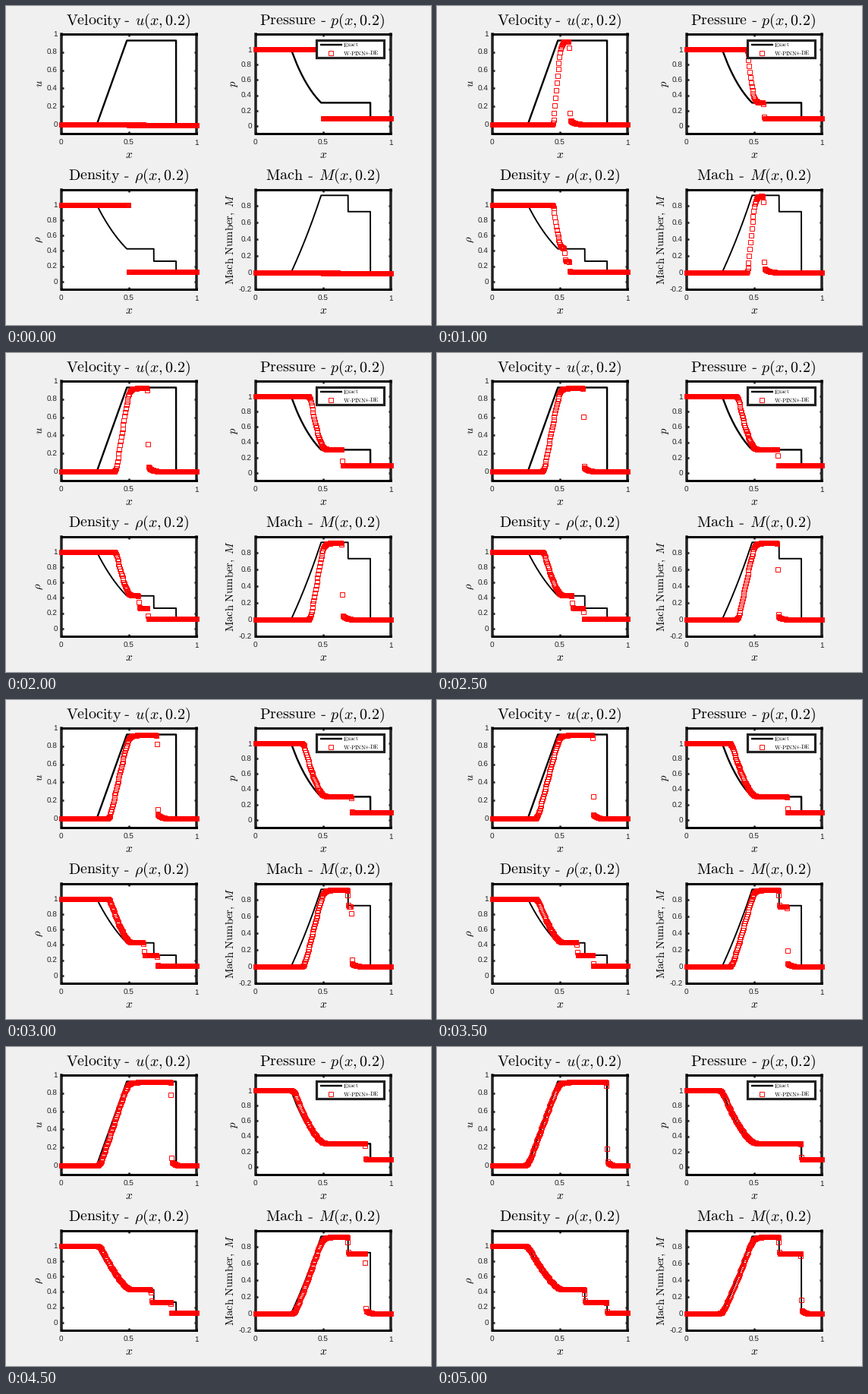
Animation, 560 px wide and 420 px high, one loop 5.5 s. Source, as a matplotlib script:

```python
import numpy as np
import matplotlib.pyplot as plt
from matplotlib.animation import FuncAnimation
from matplotlib.patches import Rectangle

W, H = 560, 420
PX = 0.72  # points per pixel at 100 dpi
STEPS, T_END = 11, 0.2
RED, DARK = "#ff0000", "#222222"
SQUARE = dict(marker="s", ls="", ms=5.2 * PX, mew=0.95 * PX, mec=RED, mfc="none")

plt.rcParams.update({
    "font.family": "Liberation Sans",
    "mathtext.fontset": "cm",
    "axes.unicode_minus": False,
    "text.hinting": "none",
})

# Sod shock tube constants
C0 = np.sqrt(1.4)
U_STAR, P_STAR, RHO_STAR = 0.9274, 0.3031, 0.2656
P_R, RHO_R = 0.1, 0.125
HEAD, TAIL, SHOCK = -C0, -0.0703, 1.7522


def exact(x, t):
    """Sharp solution: velocity, pressure, density."""
    s = (x - 0.5) / t
    u = U_STAR * np.clip((s - HEAD) / (TAIL - HEAD), 0, 1)
    a = 1 - 0.2 * u / C0
    p, rho = a**7, a**5
    rho = np.where(s > U_STAR, RHO_STAR, rho)
    ahead = s > SHOCK
    return np.where(ahead, 0, u), np.where(ahead, P_R, p), np.where(ahead, RHO_R, rho)


def drop(x, pos, width):
    """Smooth step from 1 down to 0."""
    return 0.5 * (1 - np.tanh((x - pos) / (2 * width)))


def predicted(x, t):
    """Slightly smeared network solution."""
    if t == 0:
        left = x < 0.5
        ripple = 0.008 * (np.abs(x - 0.56) < 0.055) * (np.sin(150 * x) > -0.3)
        u = np.where(left, 0, ripple - 0.008)
        return u, np.where(left, 1, P_R), np.where(left, 1, RHO_R)

    a, b = 0.5 + HEAD * t, 0.506 + TAIL * t
    da, db = 0.0015 + 0.035 * t, 0.008 + 0.03 * t
    ramp = da * np.logaddexp(0, (x - a) / da) - db * np.logaddexp(0, (x - b) / db)
    u = 0.919 * ramp / (b - a)
    k = 1 - 0.2 * u / C0

    pos = 0.5004 + 1.748 * t + 0.0022 * np.exp(-(t / 0.05)**4)
    shock = drop(x, pos, 0.001)
    contact = drop(x, 0.5 + U_STAR * t, 0.0016)
    foot = 0.057 * np.exp(-np.maximum(x - pos, 0) / (0.0356 - 0.09 * t))

    rho = k**5 * contact + RHO_STAR * (1 - contact)
    return (u * shock + foot * (1 - shock),
            k**7 * shock + P_R * (1 - shock),
            rho * shock + RHO_R * (1 - shock))


def sound(p, rho):
    return np.sqrt(1.4 * p / rho)


xs = np.linspace(0, 1, 210)
fine = np.linspace(0, 1, 3001)
_, p_end, rho_end = predicted(xs, T_END)
c_end = sound(p_end, rho_end)


def curves(t):
    u, p, rho = predicted(xs, t)
    return u, p, rho, u / c_end


fig = plt.figure(figsize=(W / 100, H / 100), dpi=100, facecolor="#f0f0f0")

# Pixel-coordinate layer for text and legend
top = fig.add_axes([0, 0, 1, 1], zorder=5)
top.set(xlim=(0, W), ylim=(H, 0))
top.axis("off")


def tex(x, y, s, px, **kw):
    kw.setdefault("va", "baseline")
    top.text(x, y, f"${s}$", fontsize=px * PX, color="black", **kw)


def hyphen(x, y, px):
    top.add_patch(Rectangle((x, y - 0.24 * px), 0.265 * px, 0.055 * px,
                            fc="black", lw=0, snap=False))


def panel(x, y, ylim, ticks, word, func, span, dash, ylabel, label_x, curve, lw):
    w, h = 178, 131.3
    ax = fig.add_axes([x / W, 1 - (y + h) / H, w / W, h / H])
    ax.set(xlim=(0, 1), ylim=ylim, xticks=[0, 0.5, 1], yticks=ticks)
    ax.set_xticklabels(["0", "0.5", "1"])
    ax.set_yticklabels([f"{round(v, 1):g}" for v in ticks])
    ax.tick_params(direction="in", length=2.8 * PX, width=2.6 * PX, color=DARK,
                   labelcolor=DARK, labelsize=10 * PX, top=True, right=True)
    ax.tick_params(axis="x", pad=8 * PX)
    ax.tick_params(axis="y", pad=5 * PX)
    for side, spine in ax.spines.items():
        level = side in ("top", "bottom")
        spine.set(color="black" if level else DARK, lw=(3 if level else 3.5) * PX)

    base = y - 12.2
    tex(span[0] - 1, base, rf"\mathrm{{{word}}}", 20)
    hyphen(dash, base, 20)
    tex(span[1], base, func, 20, ha="right")
    tex(x + w / 2 + 0.5, y + 159.7, "x", 15.5, ha="center", va="center")
    tex(label_x, y + h / 2, ylabel, 14.7, ha="center", va="center", rotation=90)

    ax.plot(fine, curve, color="black", lw=lw * PX, zorder=2)
    dots, = ax.plot([], [], clip_on=False, zorder=3, **SQUARE)
    return dots


u, p, rho = exact(fine, T_END)
fifths = np.arange(6) * 0.2
LEFT, RIGHT, UPPER, LOWER = 72.7, 328.7, 36.8, 241.6

dots = [
    panel(LEFT, UPPER, (-0.1, 1), fifths, "Velocity", "u(x,0.2)",
          (80, 243), 156.5, "u", 44, u, 2.4),
    panel(RIGHT, UPPER, (-0.1, 1.2), fifths, "Pressure", "p(x,0.2)",
          (335, 499), 415.5, "p", 301, p, 2.4),
    panel(LEFT, LOWER, (-0.1, 1.2), fifths, "Density", r"\rho(x,0.2)",
          (83, 241), 156, r"\rho", 44, rho, 1.9),
    panel(RIGHT, LOWER, (-0.2, 1), np.arange(-1, 5) * 0.2, "Mach", "M(x,0.2)",
          (343, 493), 398.5, r"\mathrm{Mach\ Number,}\ M", 296, u / sound(p, rho), 1.9),
]

# Legend
top.add_patch(Rectangle((408.6, 44.8), 89.4, 23.4, fc="white", ec=DARK, lw=3.2 * PX))
top.plot([413.5, 442.5], [51, 51], color="black", lw=2.4 * PX, solid_capstyle="butt")
top.plot(428, 62, **SQUARE)
tex(444, 53.5, r"\mathrm{Exact}", 7.6)
for x, part in ((444, "W"), (454.5, "PINNs"), (479, "DE")):
    tex(x, 64.5, rf"\mathrm{{{part}}}", 7.6)
for x in (453, 477.7):
    hyphen(x, 64.5, 7.6)


def update(i):
    for line, y in zip(dots, curves(T_END * i / (STEPS - 1))):
        line.set_data(xs, y)
    return dots


anim = FuncAnimation(fig, update, frames=STEPS, interval=500, repeat=True, repeat_delay=0)
plt.show()
```
